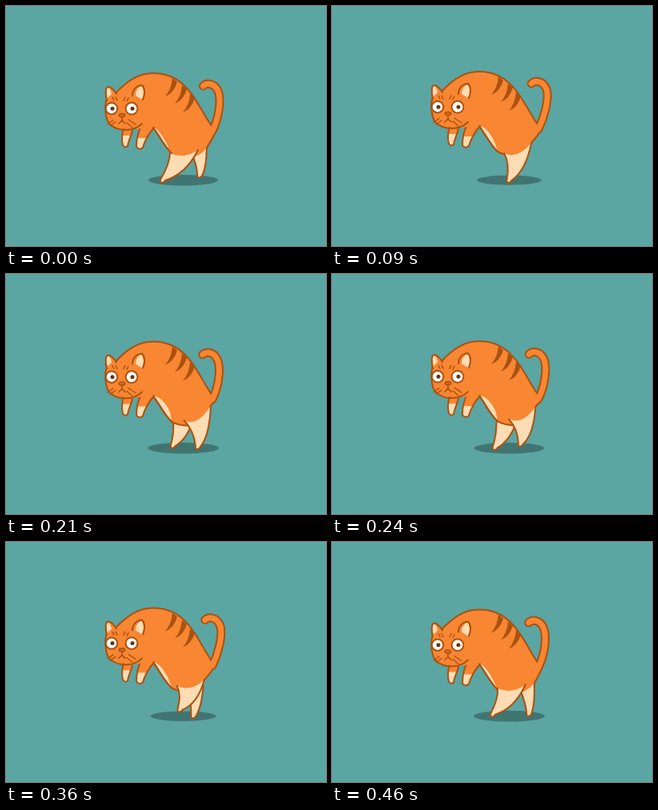
An HTML page with a canvas for the animation above (0.49 s loop, 400 by 300 pixels).

```html
<!DOCTYPE html>
<html lang="en">
<head>
<meta charset="utf-8">
<title>Walking cat</title>
<style>
  html, body { margin: 0; width: 100%; height: 100%; overflow: hidden; background: #5ba5a3; }
  canvas { display: block; width: 400px; height: 300px; }
</style>
</head>
<body>
<canvas id="stage"></canvas>
<script>
const LOOP = 490, STANCE = 200;
const ORANGE = '#f88632', LINE = '#a9520f', CREAM = '#fbdcb4';

const canvas = document.getElementById('stage');
const ratio = window.devicePixelRatio || 1;
canvas.width = 400 * ratio;
canvas.height = 300 * ratio;
const ctx = canvas.getContext('2d');

function fill(d, color) {
  ctx.fillStyle = color;
  ctx.fill(new Path2D(d));
}

function stroke(d, width = 2, color = LINE) {
  ctx.strokeStyle = color;
  ctx.lineWidth = width;
  ctx.stroke(new Path2D(d));
}

function ellipse(x, y, rx, ry, color, outline) {
  ctx.beginPath();
  ctx.ellipse(x, y, rx, ry, 0, 0, Math.PI * 2);
  ctx.fillStyle = color;
  ctx.fill();
  if (outline) {
    ctx.strokeStyle = LINE;
    ctx.lineWidth = outline;
    ctx.stroke();
  }
}

// The foot slides back along the ground, then lifts and swings forward
function footAt(t) {
  t %= LOOP;
  if (t < STANCE) {
    return { reach: 45 * (1 - (1 - t / STANCE) ** 1.4), lift: 0 };
  }
  const v = (t - STANCE) / (LOOP - STANCE);
  return { reach: 45 * (1 - v ** 1.1), lift: 9 * Math.sin(Math.PI * v ** 0.8) };
}

// Both sides of the hip follow the foot's reach
function nearPose(t) {
  const { reach, lift } = footAt(t);
  return {
    reach, bend: 4,
    lx: 205 + 0.4 * reach, ly: 184 - 0.5 * lift,
    fx: 196 + reach, fy: 220 - lift,
    rx: 240 + 0.36 * reach, ry: 180 - 0.35 * reach
  };
}

function farPose(t) {
  const { reach, lift } = footAt(t + LOOP / 2);
  return {
    reach, bend: 1,
    lx: 205 + 0.7 * reach, ly: 185,
    fx: 203 + reach, fy: 219.5 - lift,
    rx: 230 + 0.53 * reach, ry: 186 - 0.22 * reach
  };
}

function legPath({ lx, ly, fx, fy, rx, ry, bend }) {
  return `M${lx},${ly} Q${(lx + fx) / 2 + bend},${(ly + fy) / 2 - bend} ${fx - 3},${fy - 3}
    C${fx - 4},${fy + 2} ${fx + 1},${fy + 2} ${fx + 3},${fy - 2}
    Q${(rx + fx) / 2 + bend + 3},${(ry + fy) / 2 + bend + 6} ${rx},${ry}`;
}

function nearLeg(p) {
  const { lx, ly, rx, ry } = p;
  const d = legPath(p);
  fill(`${d} C${rx - 8},${ry - 25} ${lx - 12},${ly - 22} ${lx},${ly}Z`, ORANGE);
  fill(`${d} Q${(lx + rx) / 2},${Math.max(ly, ry) + 8} ${lx},${ly}Z`, CREAM);
  stroke(d);
}

const CHIN = 'C122.5,125 124.5,143 130,148 C140,157 159,158 170,147';
const BELLY = 'C191,161 198,176 207,184';

function body(flankX, flankY, tail, stretch) {
  stroke(tail, 11);
  fill(`M126,116 ${CHIN} L184,152 ${BELLY} Q216,189 228,189 Q242,189 ${flankX},${flankY}
    Q264,157 268,141 L257,150 C247,136 240,119 228,105
    C216,91 203,84 183,84 C162,84 147,98 137,109Z`, ORANGE);
  fill(`M184,152 C${190 + 4 * stretch},152 ${199 + 8 * stretch},167 207,184
    C198,176 191,161 184,152Z`, CREAM);
  stroke(`M184,152 ${BELLY} Q216,189 228,189`);
  stroke(`M268,141 Q264,157 ${flankX},${flankY}`);
  stroke('M137,109 C147,98 162,84 183,84 C203,84 216,91 228,105 C240,119 247,136 257,150');
  stroke(tail, 7, ORANGE);
  for (const top of ['208,90', '220,99', '230,110']) {
    fill(`M${top} q-1,14 -9,23 q11,-4 15,-18Z`, LINE);
  }
}

function paw(d, cut) {
  fill(d, ORANGE);
  ctx.save();
  ctx.clip(new Path2D(d));
  ctx.fillStyle = CREAM;
  ctx.fillRect(140, cut, 45, 30);
  ctx.restore();
  stroke(d);
}

function ear(outline, inner) {
  fill(outline, ORANGE);
  fill(inner, CREAM);
  stroke(outline);
}

function eye(x, r) {
  ellipse(x, 128.2, r, r, '#fff', 2);
  ellipse(x + 1, 128.2, 2.5, 2.5, '#6b3510');
}

function front() {
  paw('M147,153 C144,163 145,170 146,174 Q149,178 152,175 C153,168 156,164 158,156', 162);
  paw('M170,148 C165,157 163,167 163,176 Q167,181 171,177 C173,170 179,159 185,152', 165);
  fill('M146,148 H169 V146 L185,148 L183,151 L170,153 Q158,155 146,153Z', ORANGE);
  stroke('M126,116 ' + CHIN);

  ear('M126,118 C124,110 124,101 128,101 C131,101 136,106 138,110',
      'M127,115 C125,108 125,103 128,102 Q131,104 132,110Z');
  ear('M158,112 C158,104 164,99 170,99 C174,103 174,111 171,117',
      'M162,112 C162,105 166,101 170,100 Q174,108 170,117Z');

  stroke('M135,118 L133,114 M139,118 L137,114 M147,118 L149,114 M151,119 L153,115', 1.4);
  stroke('M127,147.5 L134,142.5 M130,150 L137,145 M153,142 L162,148 M151,146 L158,152', 1.3);
  eye(132, 7.2);
  eye(157, 7.4);
  ellipse(145, 136.5, 3.6, 2, '#e06b20', 1.6);
  stroke('M145,139 V143 M141,147 L145,143 L149,147', 1.6);
}

function draw(t) {
  // 0 at the top of a step, 1 at the bottom
  const sink = (1 - Math.cos((t - 85) / LOOP * 4 * Math.PI)) / 2;
  const sway = sink - 0.79, dy = 2.5 * sway;
  const near = nearPose(t), far = farPose(t);
  const flank = near.rx > far.rx ? near : far;
  const tx = -3.5 * sway, ty = 1.5 * sway;
  const tail = `M${246.5 + tx},${100 + ty}
    C${251 + tx},${95.5 + ty} ${262 + tx},${96 + ty} ${266 + tx},${109 + ty}
    C${269 + tx * 0.7},${122 + ty} 265,142 258,156`;

  ctx.setTransform(ratio, 0, 0, ratio, 0, 0);
  ctx.lineCap = ctx.lineJoin = 'round';
  ctx.fillStyle = '#5ba5a3';
  ctx.fillRect(0, 0, 400, 300);
  ellipse(221.5, 217.7, 40.3 + 4.2 * sink, 6.1 + 0.8 * sink, '#417572');

  const leg = legPath(far);
  fill(leg + 'Z', CREAM);
  stroke(leg);

  ctx.save();
  ctx.translate(0, dy);
  body(flank.rx, flank.ry - dy, tail, near.reach / 45);
  ctx.restore();

  nearLeg(near);

  ctx.save();
  ctx.translate(0, dy);
  stroke('M184,152 ' + BELLY);
  front();
  ctx.restore();
}

// Poses are held for 30 ms; the one at 390 ms stays 10 ms longer
function held(t) {
  const late = t < 400 ? 0 : 10;
  return Math.floor((t - late) / 30) * 30 + (t < 430 ? 0 : late);
}

const start = performance.now();
function tick() {
  draw(held((performance.now() - start) % LOOP));
  requestAnimationFrame(tick);
}
tick();
</script>
</body>
</html>
```
